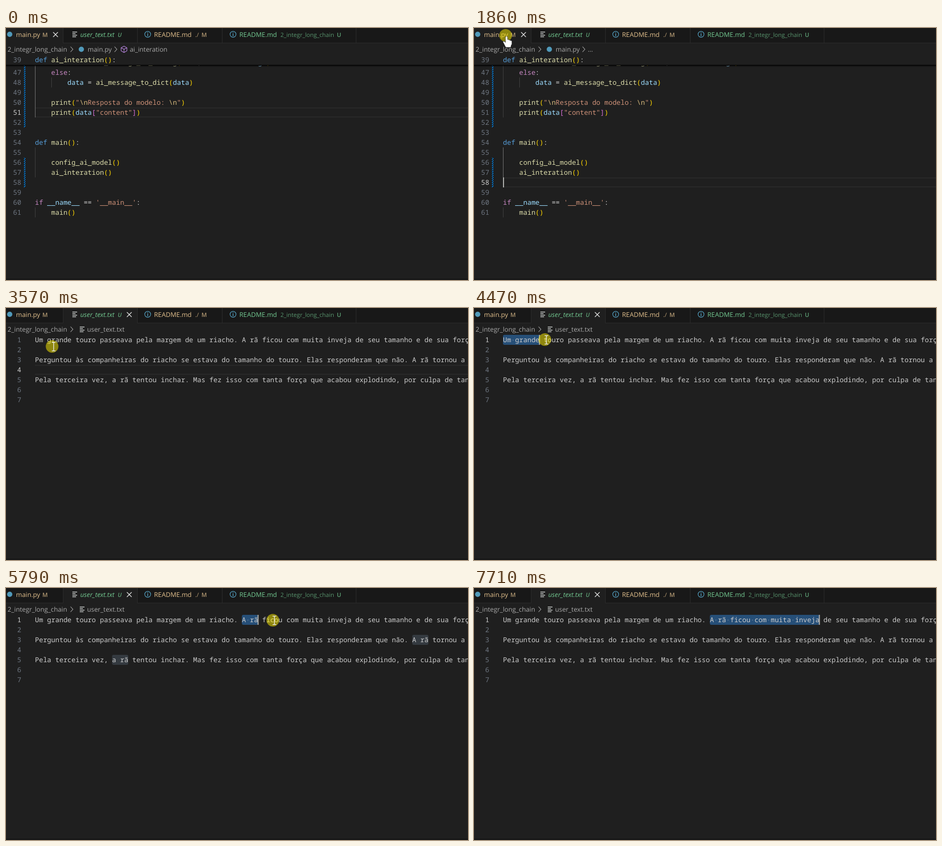
Recreate the animation shown at these times as an HTML page with a canvas. Size 877 px wide and 479 px high, loop 8000 ms.

```html
<!DOCTYPE html>
<html lang="pt">
<head>
<meta charset="utf-8">
<title>Editor</title>
<style>
html, body { margin: 0; width: 100%; height: 100%; overflow: hidden; background: #1f1f1f; }
canvas { display: block; }
</style>
</head>
<body>
<canvas id="stage" width="877" height="479"></canvas>
<script>
const g = document.getElementById('stage').getContext('2d');
const LOOP = 8000, LEFT = 55, CH = 7.7, ROW = 19;
const MONO = '12.83px "Noto Sans Mono", "DejaVu Sans Mono", monospace';
const UI = '"Open Sans", "Noto Sans", sans-serif';
const TAN = '#e2c08d', GREEN = '#73c991', BLUE = '#519aba', GREY = '#a9a9a9', TEXT = '#cccccc';

const code = {
  46: '        data = ai_message_to_string(data, content=message)',
  47: '    else:',
  48: '        data = ai_message_to_dict(data)',
  50: '    print("\\nResposta do modelo: \\n")',
  51: '    print(data["content"])',
  54: 'def main():',
  56: '    config_ai_model()',
  57: '    ai_interation()',
  60: "if __name__ == '__main__':",
  61: '    main()'
};
const story = [
  'Um grande touro passeava pela margem de um riacho. A rã ficou com muita inveja de seu tamanho e de sua força.',
  '',
  'Perguntou às companheiras do riacho se estava do tamanho do touro. Elas responderam que não. A rã tornou a',
  '',
  'Pela terceira vez, a rã tentou inchar. Mas fez isso com tanta força que acabou explodindo, por culpa de tanta',
  '', ''
];

// Pointer path: time, x, y
const path = [
  [130, 444, 396], [540, 210, 293], [740, 210, 293], [1090, 142, 192], [1510, 60, 282],
  [1580, 18, 318], [1720, 100, 150], [1860, 60, 14], [2060, 60, 14], [2200, 190, 14],
  [2340, 204, 257], [2600, 204, 257], [2870, 206, 45], [3360, 104, 80], [3910, 61, 62],
  [4110, 61, 62], [4180, 78, 61], [4400, 124, 60], [4470, 134, 60], [4890, 345, 60],
  [4960, 376, 60], [5310, 447, 61], [5580, 447, 61], [5650, 456, 61], [6200, 653, 62],
  [6350, 653, 62], [6420, 646, 62], [6560, 633, 62], [6760, 653, 62], [7160, 653, 62],
  [7640, 780, 458], [7710, 780, 458]
];

function pointer(t) {
  const i = path.findIndex(p => p[0] > t);
  if (i < 1) return null;
  const [a, b] = [path[i - 1], path[i]], k = (t - a[0]) / (b[0] - a[0]);
  return { x: a[1] + (b[1] - a[1]) * k, y: a[2] + (b[2] - a[2]) * k };
}

const colX = c => LEFT + c * CH;

function rect(x, y, w, h, color) {
  g.fillStyle = color;
  g.fillRect(x, y, w, h);
}

function box(x, y, w, h, color) {
  g.fillStyle = color;
  g.beginPath();
  g.roundRect(x, y, w, h, 3);
  g.fill();
}

function line(color, width, ...pts) {
  g.strokeStyle = color;
  g.lineWidth = width;
  g.beginPath();
  for (let i = 0; i < pts.length; i += 2) g.lineTo(pts[i], pts[i + 1]);
  g.stroke();
}

function disc(x, y, r, color) {
  g.fillStyle = color;
  g.beginPath();
  g.arc(x, y, r, 0, 7);
  g.fill();
}

function label(s, x, y, color, { size = 12.3, style = '', alpha = 1 } = {}) {
  g.font = `${style} ${size}px ${UI}`;
  g.globalAlpha = alpha;
  g.fillStyle = color;
  g.fillText(s, x, y);
  g.globalAlpha = 1;
}

function mono(s, x, y, color) {
  g.font = MONO;
  g.fillStyle = color;
  [...s].forEach((c, i) => c !== ' ' && g.fillText(c, x + i * CH, y));
}

function lineNumber(n, top, active) {
  mono(String(n), 29 - CH * String(n).length, top + 14, active ? TEXT : '#6e7681');
}

const tokens = /(["'].*?["'])|\b(def)\b|\b(if|else)\b|(\w+)(?=\()|([()])|([[\]])|([a-z_]\w*)|(.)/g;
const colors = ['#ce9178', '#569cd6', '#c586c0', '#dcdcaa', '#ffd700', '#da70d6', '#9cdcfe', '#d4d4d4'];

function codeLine(s, top) {
  for (const m of s.matchAll(tokens)) {
    let x = colX(m.index);
    const kind = m.slice(1).findIndex(v => v !== undefined);
    for (const part of m[0].split(/(\\n)/)) {
      mono(part, x, top + 14, part === '\\n' ? '#d7ba7d' : colors[kind]);
      x += part.length * CH;
    }
  }
}

function rowHighlight(top) {
  rect(LEFT, top, 822, 2, '#282828');
  rect(LEFT, top + ROW - 2, 822, 2, '#282828');
}

// Diagonally hatched change marker in the gutter
function changeBar(y1, y2) {
  g.setLineDash([2, 2]);
  for (let i = 0; i < 3; i++) {
    g.lineDashOffset = -i;
    line('#0078d4', 1, 34.5 + i, y2, 34.5 + i, y1);
  }
  g.setLineDash([]);
}

function infoIcon(x, y) {
  g.strokeStyle = BLUE;
  g.lineWidth = 1.2;
  g.beginPath();
  g.arc(x, y, 5.6, 0, 7);
  g.stroke();
  rect(x - 0.75, y - 1, 1.5, 4.5, BLUE);
  rect(x - 0.75, y - 3.5, 1.5, 1.5, BLUE);
}

function textIcon(x, y) {
  [9, 6, 9, 7].forEach((w, i) => rect(x, y + i * 3, w, 1.3, '#d4d7d6'));
}

function cubeIcon(x, y) {
  const c = '#b180d7';
  line(c, 1.1, x, y - 6, x + 5.5, y - 3, x + 5.5, y + 3, x, y + 6, x - 5.5, y + 3, x - 5.5, y - 3, x, y - 6);
  line(c, 1.1, x - 5.5, y - 3, x, y, x + 5.5, y - 3);
  line(c, 1.1, x, y, x, y + 6);
}

const chevron = x => line(GREY, 1.1, x, 35.5, x + 4.5, 40.5, x, 45.5);

function closeIcon(x) {
  line('#e0e0e0', 1.3, x - 4.5, 8, x + 4.5, 17);
  line('#e0e0e0', 1.3, x + 4.5, 8, x - 4.5, 17);
}

function tabs(active, p) {
  const edges = [0, 109, 250, 411, 665];
  const badge = { size: 11.1, style: '600', alpha: 0.75 };
  rect(0, 0, 877, 29, '#181818');
  rect(0, 28, 877, 1, '#2b2b2b');
  rect(edges[active], 0, edges[active + 1] - edges[active], 29, '#1f1f1f');
  edges.slice(1).forEach(x => rect(x - 1, 0, 1, 29, '#2b2b2b'));
  disc(7, 12, 5, BLUE);
  label('main.py', 19, 17, TAN);
  label('M', 69, 17, TAN, badge);
  textIcon(126, 7);
  label('user_text.txt', 141, 17, GREEN, { style: 'italic' });
  label('U', 212, 17, GREEN, { ...badge, style: 'italic 600' });
  infoIcon(269, 12);
  label('README.md', 281, 17, TAN);
  label('./', 359, 17, TAN, { size: 11.1, alpha: 0.8 });
  label('M', 371, 17, TAN, badge);
  infoIcon(431, 12);
  label('README.md', 443, 17, GREEN);
  label('2_integr_long_chain', 521, 17, GREEN, { size: 11.1, alpha: 0.7 });
  label('U', 628, 17, GREEN, badge);
  [94, 234].forEach((x, i) => {
    const hover = p && p.y < 28 && p.x > edges[i] && p.x < edges[i + 1];
    if (active === i || hover) closeIcon(x);
  });
}

function caret(x, top) {
  rect(x, top, 2, ROW, '#aeafad');
}

function codeView(t) {
  const top = n => 75 + (n - 47) * ROW;
  const current = t < 500 ? 51 : 58;
  const guide = (x, y1, y2, active) => rect(x, y1, 1, y2 - y1, active ? '#707070' : '#404040');

  g.save();
  g.beginPath();
  g.rect(0, 71, 877, 408);
  g.clip();
  rowHighlight(top(current));
  guide(LEFT, 71, top(52), current === 51);
  guide(86, top(48), top(49), false);
  guide(LEFT, top(55), top(58), current === 58);
  guide(LEFT, top(61), top(62), false);
  changeBar(71, top(53));
  changeBar(top(56), top(59));
  for (let n = 46; n <= 61; n++) {
    if (n > 46) lineNumber(n, top(n), n === current);
    if (code[n]) codeLine(code[n], top(n));
  }
  if (t >= 500 && (t < 540 || Math.floor((t - 540) / 500) % 2 === 0)) caret(LEFT, top(58));
  g.restore();

  const shade = g.createLinearGradient(0, 70, 0, 74);
  shade.addColorStop(0, '#000');
  shade.addColorStop(1, '#0000');
  rect(0, 70, 877, 4, shade);
  lineNumber(39, 51, false);
  codeLine('def ai_interation():', 51);

  disc(143, 40.5, 5, BLUE);
  label('main.py', 155, 45, GREY);
  chevron(206);
  if (t < 740) {
    cubeIcon(224, 40.5);
    label('ai_interation', 235, 45, GREY);
  } else label('...', 216, 45, GREY);
}

// Selected columns of the first line; the selection trails the pointer slightly
function selection(t) {
  if (t < 4250) return [0, 0];
  const at = time => Math.round((pointer(time).x - LEFT) / CH);
  if (t < 5580) return [0, Math.min(42, at(Math.min(t - 70, 4970)))];
  return [51, Math.max(51, at(Math.min(t - 70, 6200)))];
}

function textCaretOn(t) {
  if (t >= 4110 && t < 5070) return true;
  const base = t < 4110 ? 2600 : t < 5580 ? 5070 : 5710;
  return t >= 5580 && t < base || Math.floor((t - base) / 500) % 2 === 0;
}

function textView(t, p) {
  const top = n => 51 + (n - 1) * ROW;
  const current = t < 4110 ? 4 : 1;
  const [from, to] = selection(t);

  if (from === to) rowHighlight(top(current));
  else {
    const word = story[0].slice(from, to).toLowerCase();
    story.forEach((s, row) => {
      const low = s.toLowerCase();
      for (let i = low.indexOf(word); i >= 0; i = low.indexOf(word, i + word.length)) {
        if (row || i !== from) box(colX(i), top(row + 1), word.length * CH, ROW, 'rgba(173,214,255,.15)');
      }
    });
    box(colX(from), top(1), (to - from) * CH, ROW, '#264f78');
    for (let i = from; i < to; i++) {
      if (story[0][i] === ' ') disc(colX(i + 0.5), 61, 0.9, 'rgba(227,228,226,.3)');
    }
  }
  story.forEach((s, i) => {
    lineNumber(i + 1, top(i + 1), i + 1 === current);
    mono(s, LEFT, top(i + 1) + 14, TEXT);
  });
  if (textCaretOn(t)) caret(colX(to) - (to ? 1 : 0), top(current));

  textIcon(140, 35.5);
  const hover = p && p.y > 29 && p.y < 51 && p.x > 138 && p.x < 226;
  label('user_text.txt', 154, 45, hover ? '#e8e8e8' : GREY);
}

function drawPointer({ x, y }) {
  disc(x, y, 12, 'rgba(255,240,0,.5)');
  if (y < 51) {
    g.save();
    g.translate(x, y);
    g.beginPath();
    g.roundRect(0, 2, 3.5, 14, 1.7);
    g.roundRect(3.2, 8, 3.2, 8, 1.5);
    g.roundRect(6, 9, 3, 8, 1.5);
    g.roundRect(8.6, 10, 3, 8, 1.5);
    g.moveTo(-5, 12);
    g.lineTo(-2.5, 11.5);
    g.lineTo(0, 14);
    g.lineTo(11.6, 14);
    g.lineTo(9.5, 22.5);
    g.lineTo(0.5, 22.5);
    g.closePath();
    g.strokeStyle = '#222';
    g.lineWidth = 1.2;
    g.stroke();
    g.fillStyle = '#fff';
    g.fill('nonzero');
    g.restore();
  } else {
    const cx = Math.round(x) + 2.5, cy = Math.round(y);
    line('#f0f0f0', 1.3, cx, cy - 7, cx, cy + 8);
    for (const e of [cy - 7.5, cy + 8.5]) line('#f0f0f0', 1.2, cx - 3.5, e, cx + 3.5, e);
  }
}

function draw(now) {
  const t = now % LOOP, p = pointer(t), inText = t >= 2600;
  g.textRendering = 'geometricPrecision';
  rect(0, 0, 877, 479, '#1f1f1f');
  rect(0, 476, 877, 3, '#181818');
  tabs(inText ? 1 : 0, p);
  label('2_integr_long_chain', 3, 45, GREY);
  chevron(122.5);
  if (inText) textView(t, p);
  else codeView(t);
  if (p) drawPointer(p);
}

const start = performance.now();
function tick() {
  draw(performance.now() - start);
  requestAnimationFrame(tick);
}
tick();
</script>
</body>
</html>
```
